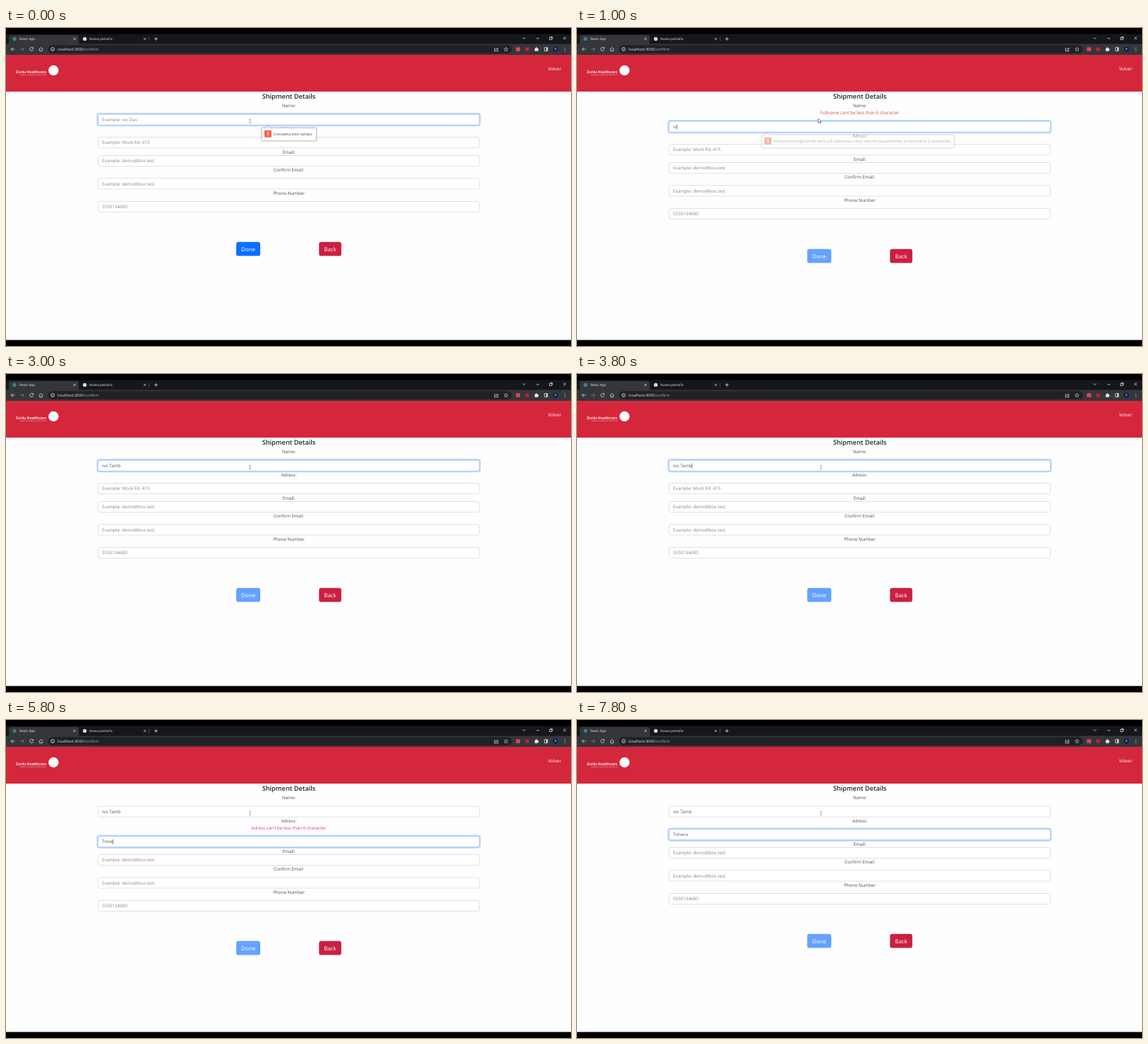
Recreate the animation shown at these times as an HTML page. Size 800 by 450 pixels, loop 8000 ms.

```html
<!DOCTYPE html>
<html lang="en">
<head>
<meta charset="utf-8">
<title>Shipment form</title>
<style>
html, body { margin: 0; width: 100%; height: 100%; overflow: hidden; background: #000; }
svg { display: block; width: 100vw; height: 100vh; }
text { font: 6.25px "Open Sans", "Noto Sans", sans-serif; white-space: pre; text-rendering: geometricPrecision; }
.mid { text-anchor: middle; }
.label { fill: #4b4f54; }
.value { fill: #53585e; }
.hint { fill: #80868c; }
.error { fill: #e2415a; }
.tab { font-size: 4.7px; fill: #e8eaed; }
.button { font-size: 7.9px; fill: #fff; }
.line { fill: none; stroke: #dadce0; stroke-width: .8; }
.field { fill: #fff; stroke: #ced4da; stroke-width: .7; }
.field.on { stroke: #86b7fe; }
.glow { fill: none; stroke: #0d6efd; stroke-opacity: .27; stroke-width: 1.8; }
.bubble { fill: #fff; stroke: #b9bbbe; stroke-width: .6; filter: drop-shadow(.6px .9px .9px #0006); }
</style>
</head>
<body>
<svg id="stage" viewBox="0 0 800 450"></svg>
<script>
const LOOP = 8000, STEP = 200, BLINK = 530, SHIFT = 10;
const NAME = { text: "Ivo Tamb", keys: [800, 1000, 1200, 1400, 1800, 2000, 2200, 2400], focus: -530 };
const ADDRESS = { text: "Tolvera", keys: [5200, 5400, 5600, 5600, 5800, 6000, 6200], focus: 4400 };
const MIN_LENGTH = 6;

const text = (x, y, cls, str, more = "") => `<text x="${x}" y="${y}" class="${cls}" ${more}>${str}</text>`;
const path = (d, more = "") => `<path d="${d}" class="line" ${more}/>`;
const rect = (x, y, w, h, fill, r = 0) => `<rect x="${x}" y="${y}" width="${w}" height="${h}" rx="${r}" fill="${fill}"/>`;
const dot = (x, y, r, fill) => `<circle cx="${x}" cy="${y}" r="${r}" fill="${fill}"/>`;
const cross = (x, y, r) => path(`M${x - r} ${y - r}l${2 * r} ${2 * r}m0 ${-2 * r}l${-2 * r} ${2 * r}`);

const field = (y, hint, id = "") => `
  <g id="${id}">
    <rect class="glow" x="129.2" y="${y - 8.9}" width="542.1" height="17.4" rx="3.2" visibility="hidden"/>
    <rect class="field" x="130.3" y="${y - 7.8}" width="540" height="15.2" rx="2.4"/>
    ${text(136, y + 2.1, "hint", hint)}
    <rect class="caret" y="${y - 3.6}" width=".6" height="7" fill="#333" visibility="hidden"/>
  </g>`;
const label = (y, str) => text(400.5, y + 2.1, "label mid", str);
const button = (x, w, fill, str, id) =>
  `<g id="${id}">${rect(x, 302.8, w, 19.8, fill, 3.2)}${text(x + w / 2, 315.6, "button mid", str)}</g>`;

const browser = () =>
  rect(0, 0, 800, 450, "#000") + rect(0, 8.5, 800, 14.5, "#16171a") +
  `<path d="M2 23q2 0 2-2v-8q0-3 3-3h93q3 0 3 3v8q0 2 2 2z" fill="#35363a"/>` +
  rect(0, 22.5, 800, 15.5, "#35363a") + rect(59.5, 24.3, 657, 11.4, "#202124", 5.7) +
  dot(12, 15.4, 2.6, "#3c7f8c") + text(19, 17.2, "tab", "React App") + cross(97, 15.4, 1.5) +
  dot(111.5, 15.4, 2.7, "#d5d7da") + text(118, 17.2, "tab", "Nueva pestaña") + cross(196.5, 15.4, 1.5) +
  path("M202.5 12.5v6", 'stroke-opacity=".35"') + path("M209.8 15.4h5m-2.5-2.5v5") +
  path("M731.2 13.4l2 2 2-2") + path("M751 14.8h4") +
  path("M769.6 13.4h3.2v3.2h-3.2zm1-1h3.2v3.2") + cross(791, 14.4, 1.8) +
  path("M12.3 30h-5.2m2.4-2.4l-2.4 2.4 2.4 2.4") +
  path("M20 30h5.2m-2.4-2.4l2.4 2.4-2.4 2.4", 'stroke-opacity=".45"') +
  path("M38.2 28.4a2.5 2.5 0 1 0 .4 2.3M38.6 27.2v1.8h-1.9") +
  path("M46.8 30l2.7-2.5 2.7 2.5M47.7 29.6v3h3.6v-3") +
  `<circle class="line" cx="66" cy="30" r="2.5" stroke-width=".6"/>` + path("M66 28.6v.5m0 .5v1.9") +
  text(73, 32, "tab", "localhost:3000<tspan fill=\"#aab0b6\">/confirm</tspan>", 'style="font-size:5.45px"') +
  path("M693 28.7h-1.2v4h5v-1.5M693.4 31.2q.4-2 3-2m-1.2-1.5l1.5 1.5-1.5 1.5", 'stroke-width=".6"') +
  path("M708 27.3l.8 1.8 2 .2-1.5 1.3.5 2-1.8-1-1.8 1 .5-2-1.5-1.3 2-.2z", 'style="stroke-width:.6"') +
  rect(722, 27.2, 6, 5.6, "#dc4650", .6) + rect(735.4, 27.4, 5, 5.2, "#c9202c", .6) +
  rect(748.7, 28.4, 4.5, 4.3, "#eceef0", .5) + dot(751, 28.2, 1, "#eceef0") + dot(753.3, 30.6, 1, "#eceef0") +
  path("M762.4 27.6h4.4v4.8h-4.4z") + rect(764.8, 27.6, 2, 4.8, "#dadce0") +
  dot(778, 30, 4, "#10275c") + dot(778, 29.4, 1, "#aebbd8") +
  [28, 30, 32].map(y => dot(791.3, y, .6, "#dadce0")).join("");

const page = () =>
  rect(0, 38, 800, 403.5, "#fefefe") + rect(0, 38, 800, 52, "#d5273b") +
  text(13.7, 64.2, "", "Zorilu Healthcare", 'fill="#fff" style="font:600 5.2px Inter,sans-serif"') +
  text(20, 66.9, "", "Equipos y material de laboratorio", 'fill="#fff" fill-opacity=".85" style="font-size:2.4px"') +
  dot(67.3, 60, 7.2, "#fff") +
  text(786, 60.2, "", "Volver", 'fill="#fff" text-anchor="end" style="font-size:6.4px"') +
  text(400.5, 100.2, "mid", "Shipment Details", 'fill="#212529" style="font-size:9.2px;font-weight:600"') +
  label(110.3, "Name:") +
  text(400.3, 122.4, "error mid", "Fullname cant be less than 6 character", 'id="nameError"') +
  `<g id="upper">${field(129.9, "Example: Ivo Dax", "name")}${label(143, "Adress:")}
   ${text(400.3, 155, "error mid", "Adress can't be less than 6 character", 'id="addressError"')}
   <g id="lower">` +
  field(162.3, "Example: Mock Rd. 415", "address") +
  label(175.4, "Email:") + field(188.2, "Example: demo@box.test") +
  label(201.2, "Confirm Email:") + field(220.6, "Example: demo@box.test") +
  label(233.6, "Phone Number") + field(253.2, "5550134680") +
  button(326, 34, "#0d6efd", "Done", "done") + button(443.2, 31.6, "#cb1f41", "Back", "back") +
  `</g></g>`;

const bubble = (id, x, y, w, str) => `
  <g id="${id}">
    <path class="bubble" d="M${x + 1} ${y}h4l2.6-2.6 2.6 2.6h${w - 11.2}q1 0 1 1v16q0 1-1 1h${-w + 2}q-1 0-1-1v-16q0-1 1-1z"/>
    ${rect(x + 3.6, y + 3.4, 10, 10, "#ee6a50", 1)}
    ${rect(x + 8.1, y + 5.4, 1.1, 3.8, "#fff")}${rect(x + 8.1, y + 10, 1.1, 1.1, "#fff")}
    ${text(x + 16.4, y + 10.9, "label", str, 'style="font-size:5.42px"')}
  </g>`;

const pointers = `
  <path id="beam" d="M344.2 129.2q1.3 0 1.3 .9v4q0 .9-1.3.9m2.6-5.8q-1.3 0-1.3.9m0 4q0 .9 1.3.9" fill="none" stroke="#777" stroke-width=".6"/>
  <path id="arrow" d="M341.6 128v6.3l1.5-1.4 1 2.3 1-.5-1-2.2h2z" fill="#fff" stroke="#222" stroke-width=".5"/>`;

const stage = document.getElementById("stage");
stage.innerHTML = browser() + page() +
  bubble("required", 362.3, 141.4, 77, "Completa este campo") +
  bubble("tooShort", 261.7, 151.4, 272, "") + pointers;

const get = id => document.getElementById(id);
const show = (el, on) => el.setAttribute("visibility", on ? "visible" : "hidden");
const shift = (el, on) => el.setAttribute("transform", `translate(0 ${on ? SHIFT : 0})`);
const typed = (input, t) => input.keys.filter(k => k <= t).length;
const tooShort = n => n > 0 && n < MIN_LENGTH;

function drawInput(id, input, t, focused) {
  const box = get(id), label = box.querySelector("text"), caret = box.querySelector(".caret");
  const n = typed(input, t);
  input.hint ??= label.textContent;
  label.textContent = n ? input.text.slice(0, n) : input.hint;
  label.setAttribute("class", n ? "value" : "hint");
  box.querySelector(".field").classList.toggle("on", focused);
  show(box.querySelector(".glow"), focused);
  const since = t - (n ? input.keys[n - 1] : input.focus);
  show(caret, focused && Math.floor(since / BLINK) % 2 === 0);
  caret.setAttribute("x", 136.2 + (n ? label.getComputedTextLength() : 0));
  return n;
}

function draw(t) {
  const onAddress = t >= ADDRESS.focus;
  const n = drawInput("name", NAME, t, !onAddress);
  const a = drawInput("address", ADDRESS, t, onAddress);
  show(get("nameError"), tooShort(n));
  show(get("addressError"), tooShort(a));
  shift(get("upper"), tooShort(n));
  shift(get("lower"), tooShort(a));
  get("done").setAttribute("opacity", n ? .63 : 1);
  show(get("required"), n === 0);
  const tip = get("tooShort");
  show(tip, n > 1 && tooShort(n));
  tip.setAttribute("opacity", n === 2 ? .45 : 1);
  tip.querySelector("text").textContent =
    `Aumenta la longitud del texto a 6 caracteres como mínimo (actualmente, el texto tiene ${n} caracteres).`;
  const arrow = n === 1 || n === 2;
  show(get("arrow"), arrow);
  show(get("beam"), !arrow);
}

const start = performance.now();
function tick() {
  const t = (performance.now() - start) % LOOP;
  draw(Math.floor(t / STEP) * STEP);
  requestAnimationFrame(tick);
}
tick();
</script>
</body>
</html>
```
